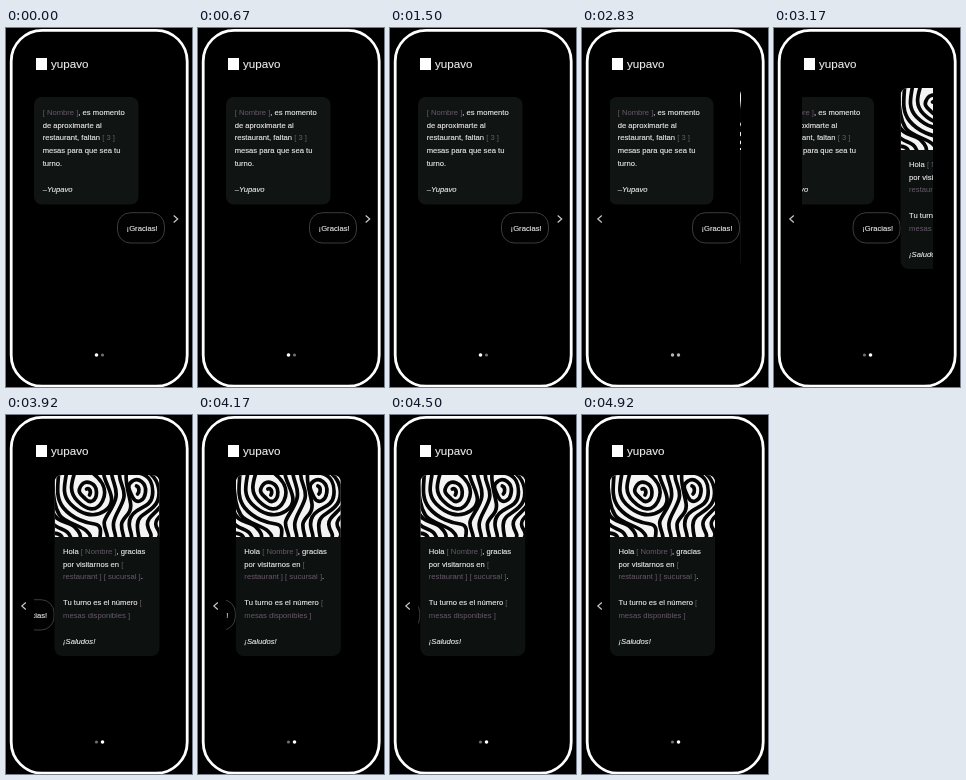
Write an HTML page that moves like this. It is 186 by 359 pixels and loops after 5 s.

```html
<!DOCTYPE html>
<html lang="es">
<head>
<meta charset="utf-8">
<style>
  html, body { margin: 0; width: 100%; height: 100%; overflow: hidden; background: #000; }
  svg { display: block; width: 100%; height: 100%; }
  text { font: 7.65px "Liberation Sans", Arial, sans-serif; fill: #ededed; stroke: #ededed; stroke-width: .12; white-space: pre; }
  .brand { font-size: 11.6px; }
  .field { fill: #68596a; stroke: none; }
  .sign { font-style: italic; }
  .line { fill: none; stroke: #c8c8c8; stroke-width: 1.2; }
  .waves path { fill: none; stroke: #050505; stroke-width: 3.7; stroke-linecap: round; }
</style>
</head>
<body>
<svg viewBox="0 0 186 359">
  <defs>
    <clipPath id="viewport"><rect x="28" y="50" width="131" height="210"/></clipPath>
    <clipPath id="cover"><path d="M0 62V8Q0 0 8 0H97Q105 0 105 8V62Z"/></clipPath>
  </defs>
  <rect width="186" height="359"/>
  <rect x="5.2" y="2.3" width="176" height="355.9" rx="31" fill="none" stroke="#fff" stroke-width="2.8"/>
  <rect x="30" y="30" width="11" height="12" fill="#fff"/>
  <text class="brand" x="45" y="40.1">yupavo</text>

  <g clip-path="url(#viewport)">
    <g id="track">
      <rect x="28" y="69" width="104.5" height="107.5" rx="8" fill="#101413"/>
      <g id="turn"></g>
      <rect x="111.5" y="184.7" width="47" height="30.3" rx="13" fill="#020202" stroke="#424242" stroke-width=".9"/>
      <text x="120.6" y="202.8">¡Gracias!</text>

      <rect x="159" y="60" width="105" height="181" rx="8" fill="#0d1110"/>
      <g transform="translate(159 60)" clip-path="url(#cover)" class="waves">
        <rect width="105" height="62" fill="#f4f4f4"/>
        <path d="M27 10C31 4 42 8 42 17S36 29 31 24 22 17 27 10ZM32 14C35 12 37 17 35 20"/>
        <path d="M20-2C17 8 14 17 23 26S42 38 48 26 46 4 38-2"/>
        <path d="M12-2C10 10 7 20 16 29S38 44 50 36 56 18 52 8 50 0 49-2"/>
        <path d="M4-2C4 8 0 22 9 33S32 48 40 49 46 58 45 65"/>
        <path d="M-2 10C-1 22 0 32 5 40S26 50 32 56 35 62 35 65"/>
        <path d="M-2 36C1 48 14 46 20 52S26 60 26 65"/>
        <path d="M-2 48C4 56 14 52 17 65M-2 58C4 58 8 60 8 65"/>
        <path d="M57-2C58 8 64 14 61 24S52 40 50 46 54 58 53 65"/>
        <path d="M65-2C64 8 72 14 69 24S60 40 59 48 62 58 61 65"/>
        <path d="M78 6C84 2 92 8 91 17S82 30 78 22 72 10 78 6ZM82 11C85 12 85 17 83 19"/>
        <path d="M72-2C70 6 74 16 76 28S67 42 67 50 70 60 69 65"/>
        <path d="M84-2C96 0 99 10 98 20S88 32 82 36 74 46 75 52 78 60 77 65"/>
        <path d="M95-2C105 6 106 18 103 26S90 38 86 42 82 52 85 65"/>
        <path d="M107 30C102 38 92 42 93 50S99 58 95 65"/>
        <path d="M107 40C102 44 99 48 103 54S104 62 103 65"/>
      </g>
      <g id="welcome"></g>
    </g>
  </g>

  <path id="next" class="line" d="M167.7 187.5L171.7 191L167.7 194.5"/>
  <path id="back" class="line" d="M19.8 187.5L15.8 191L19.8 194.5"/>
  <circle id="dotA" cx="90.5" cy="327" r="1.8"/>
  <circle id="dotB" cx="96.5" cy="327" r="1.8"/>
</svg>
<script>
const $ = id => document.getElementById(id);
const LOOP = 5000, STEP = 1000 / 12;
const SLIDE_START = 2800, SLIDE_TIME = 2050, SLIDE_WIDTH = 131;
const clamp = v => Math.min(1, Math.max(0, v));

// Text between tildes is a dim placeholder; the last line is the signature.
function addLines(id, x, y, lines) {
  $(id).innerHTML = lines.map((line, i) => {
    const spans = line.split("~").map((s, k) => k % 2 ? `<tspan class="field">${s}</tspan>` : s).join("");
    const sign = i === lines.length - 1 ? ' class="sign"' : "";
    return `<text x="${x}" y="${y + i * 12.9}"${sign}>${spans}</text>`;
  }).join("");
}

addLines("turn", 36.7, 86.6, [
  "~[ Nombre ]~, es momento", "de aproximarte al", "restaurant, faltan ~[ 3 ]~",
  "mesas para que sea tu", "turno.", "", "–Yupavo"
]);
addLines("welcome", 167.5, 138.6, [
  "Hola ~[ Nombre ]~, gracias", "por visitarnos en ~[~", "~restaurant ] [ sucursal ]~.", "",
  "Tu turno es el número ~[~", "~mesas disponibles ]~", "", "¡Saludos!"
]);

// cubic-bezier(.25, .1, .25, 1)
function ease(x) {
  const curve = (a, b, s) => 3 * a * s * (1 - s) ** 2 + 3 * b * s * s * (1 - s) + s ** 3;
  let low = 0, high = 1;
  for (let i = 0; i < 24; i++) {
    const mid = (low + high) / 2;
    if (curve(.25, .25, mid) < x) low = mid; else high = mid;
  }
  return curve(.1, 1, low);
}

function setDot(id, amount) {
  const v = Math.round(110 + 145 * amount);
  $(id).setAttribute("fill", `rgb(${v},${v},${v})`);
  $(id).setAttribute("r", 1.6 + .2 * amount);
}

function draw(time) {
  const t = Math.floor((time % LOOP + 4) / STEP) * STEP;
  const shift = SLIDE_WIDTH * ease(clamp((t - SLIDE_START) / SLIDE_TIME));
  const second = t > SLIDE_START;
  const swap = clamp((t - 2750) / 167);
  $("track").setAttribute("transform", `translate(${-shift} 0)`);
  $("next").setAttribute("visibility", second ? "hidden" : "visible");
  $("back").setAttribute("visibility", second ? "visible" : "hidden");
  setDot("dotA", 1 - swap);
  setDot("dotB", swap);
}

const start = performance.now();
function tick() {
  draw(performance.now() - start);
  requestAnimationFrame(tick);
}
tick();
</script>
</body>
</html>
```
